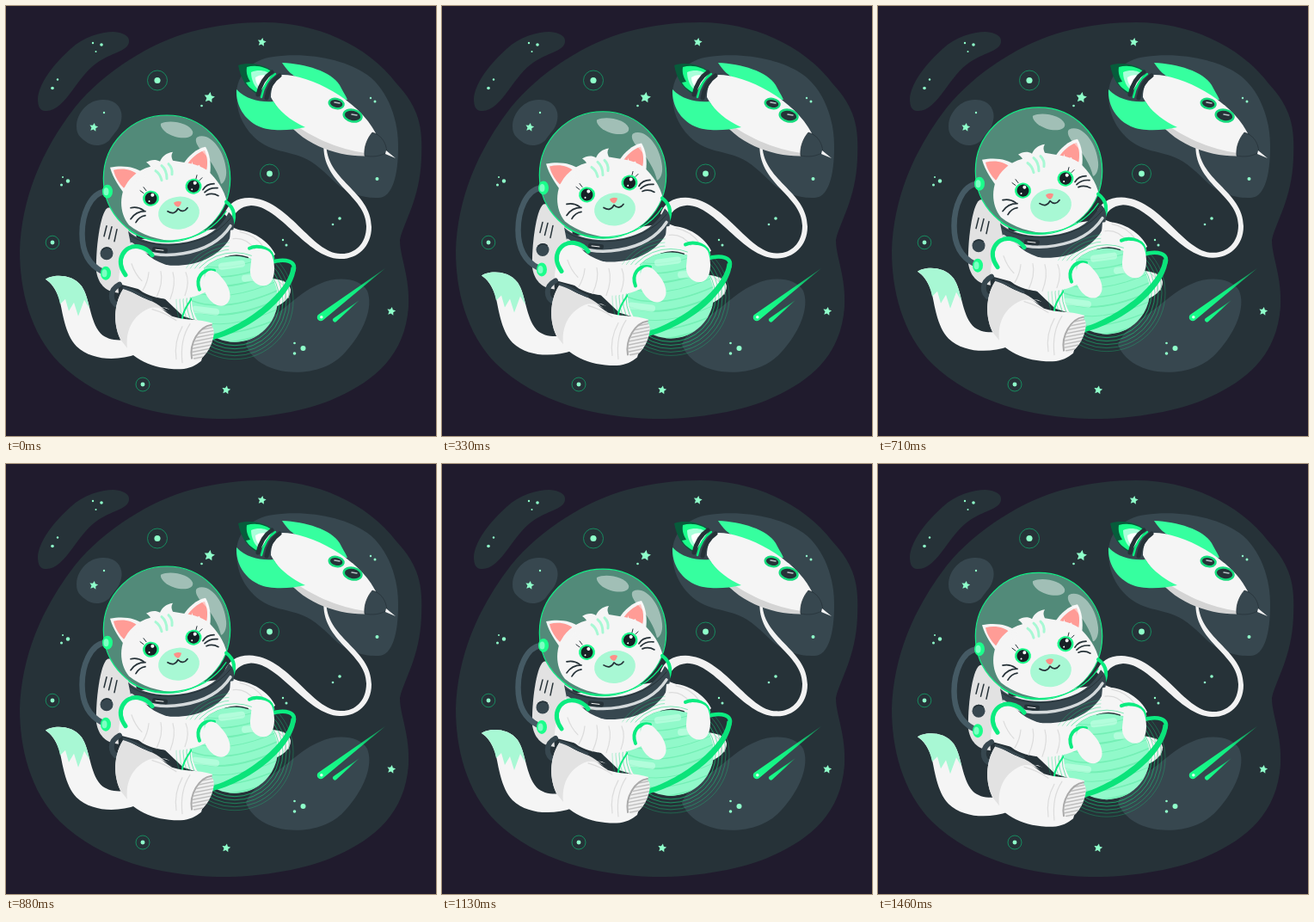
Write an HTML page that moves like this. It is 500 by 500 pixels and loops after 1.5 s.

```html
<!DOCTYPE html>
<html lang="en">
<head>
<meta charset="utf-8">
<title>Space cat</title>
<style>
html, body { margin: 0; width: 100%; height: 100%; overflow: hidden; background: #201b2d; }
svg { display: block; width: 100vw; height: 100vh; }
.line { fill: none; stroke-linecap: round; stroke-linejoin: round; }
.night { fill: #263238; }
.haze { fill: #37474f; }
.white { fill: #f5f5f5; }
.green { fill: #1bfe8b; }
.fin { fill: #36ff9f; }
.mint { fill: #a8f8d4; }
.ink { stroke: #263238; }
.slate { stroke: #37474f; }
.neon { stroke: #0bec80; }
.fold { stroke: #dcdcdc; stroke-width: 1.2; }
</style>
</head>
<body>
<svg viewBox="0 0 500 500">
  <defs>
    <linearGradient id="trail" x1="0" y1="1" x2="1" y2="0">
      <stop offset="0" stop-color="#1bfe8b"/><stop offset=".6" stop-color="#10ec80"/>
      <stop offset="1" stop-color="#0be37a" stop-opacity=".4"/>
    </linearGradient>
    <clipPath id="globe"><circle cx="266" cy="340" r="50"/></clipPath>
    <clipPath id="sole"><ellipse cx="229" cy="391" rx="9.5" ry="22" transform="rotate(25 229 391)"/></clipPath>
    <clipPath id="glass"><circle cx="187" cy="200" r="73.5"/></clipPath>
  </defs>

  <!-- sky -->
  <path class="night" d="M300 19C360 19 420 45 454 90C480 118 485 140 483 178C481 225 463 250 458 272C458 292 470 315 468 350C464 405 430 435 385 455C350 472 290 481 245 480C180 478 110 462 62 415C28 380 16 330 16 285C18 225 40 170 80 118C115 75 170 42 215 30C245 22 275 19 300 19Z"/>
  <path class="night" d="M37 108C38 90 55 68 75 50C90 36 110 30 125 30C137 31 144 35 143 42C142 51 127 54 114 61C98 69 89 82 78 97C68 111 58 122 47 122C40 123 37 117 37 108Z"/>
  <g class="haze">
    <path d="M82 140C82 124 96 109 112 109C128 108 137 120 134 133C132 144 125 148 121 155C114 164 100 164 92 157C85 152 82 148 82 140Z"/>
    <path d="M268 103C268 80 285 62 311 59C350 53 395 62 420 80C445 98 457 135 456 165C456 195 450 223 433 223C415 224 395 216 385 207C371 194 360 182 345 176C325 168 305 169 288 152C274 138 268 122 268 103Z"/>
    <path d="M365 323C385 314 411 316 420 331C428 351 415 380 395 402C378 422 350 428 325 425C298 421 284 407 279 394C285 377 305 365 325 350C337 340 350 329 365 323Z"/>
  </g>
  <g id="stars" fill="#8fffca"></g>
  <g fill="url(#trail)">
    <path d="M441 305L369 365A4 4 0 0 1 363 359Z"/>
    <path d="M411 342L384 367A2.3 2.3 0 0 1 381 363Z"/>
  </g>
  <circle cx="366.8" cy="361.8" r="1.8" fill="#d6ffec"/>

  <!-- tether -->
  <path id="rope" fill="#f2f2f2" d="M372.500 159C371 203 425 215 425 257C425 281 407 295 388 294C350 293 318 232 285 232C272 233 266 240 262 250L254 242C258 230 268 223 283 223C328 224 356 288 389 288C404 289 419 278 419 256C419 220 366 207 369.500 159Z"/>

  <!-- rocket -->
  <path fill="#075c3b" d="M270 69C282 65 300 67 311 77L293 103C279 96 273 84 270 69Z"/>
  <path class="green" d="M280 71C291 68 303 71 311 78L294 102C288 98 282 95 279 89L284 88C281 83 279 78 280 71Z"/>
  <path fill="#a9ffda" d="M285 77C295 73 304 76 309 80L296 99C289 95 285 86 285 77Z"/>
  <path fill="#fff" d="M290 83C297 79 303 80 307 83L297 96C293 93 290 89 290 83Z"/>
  <path class="fin" d="M321 66C348 67 378 76 388 92C391 98 395 104 397 109C376 108 352 94 341 85C333 81 327 75 321 66Z"/>
  <path class="white" d="M318 80C350 78 410 108 430 148L418 174C385 174 342 158 322 129C316 118 311 112 308 106C308 95 312 86 318 80Z"/>
  <path fill="#d4d4d4" d="M322 127C350 152 388 167 418 171L417 174.500C385 175 340 160 322 127Z"/>
  <path class="fin" d="M268 97C280 109 295 112 311 111C317 121 330 133 348 141C330 145 307 146 294 140C277 132 267 116 268 97Z"/>
  <g class="line">
    <path class="ink" d="M309 77Q297 85 293 103" stroke-width="5"/>
    <path class="neon" d="M313 79Q301 87 297 106" stroke-width="2.500"/>
    <path class="ink" d="M318 81Q306 89 303 107" stroke-width="5"/>
  </g>
  <path class="haze" stroke="#263238" stroke-width=".7" d="M426 147C436 150 442 158 443 170C435 175 426 176 417 174C416 164 420 154 426 147Z"/>
  <path class="white" d="M442 168L453 177L441 172Z"/>
  <g stroke="#16db7d" stroke-width="2.500" class="night">
    <ellipse cx="384" cy="113.500" rx="8.500" ry="5.500" transform="rotate(12 384 114)"/>
    <ellipse cx="403" cy="127.500" rx="10.500" ry="6.800" transform="rotate(12 403 128)"/>
  </g>
  <path class="line" stroke="#b9c3c6" stroke-width="1.500" d="M382 112L388 113M402 126L408 127"/>

  <g id="cat">
    <!-- tail -->
    <path class="white" d="M46 317C52 312 76 309 88 325C98 340 97 365 110 380C120 390 138 389 150 384L152 404C130 412 100 412 82 395C68 380 66 355 62 340C58 328 52 321 46 317Z"/>
    <path class="mint" d="M46 317C52 312 76 309 88 325C92 331 95 340 97 351L91 341L84 360L79 344L73 354L69 340L63 346C60 330 53 321 46 317Z"/>

    <!-- backpack -->
    <path fill="#e2e2e2" d="M118 234C109 240 104 285 105 308C108 325 118 332 132 333L155 300L150 252C140 240 126 232 118 234Z"/>
    <path class="line ink" stroke-width="1.500" d="M117 255L114 267M123 256L119.500 270M129 259L126 273"/>
    <circle class="haze" cx="117" cy="287" r="7.500"/>
    <path class="line ink" d="M112 283A7 7 0 0 1 122 282" stroke-width="1.500"/>
    <path class="line" stroke="#455a64" stroke-width="6.500" d="M115 215C98 217 88.500 242 88.500 264C88.500 290 100 302 112 308"/>

    <!-- torso and far leg -->
    <path class="white" d="M146 272C136 290 128 310 132 335L190 352L235 364L300 345L312 292C307 278 288 266 262 256Z"/>
    <path class="white" d="M292 320C308 312 329 318 331 329C331 341 317 349 303 353Z"/>
    <path class="line" stroke="#c9c9c9" stroke-width="1" d="M318 320Q328 327 324 342M323 319Q333 327 328 339"/>
    <path class="night" d="M130 322L132 345L186 350C196 355 207 363 219 369L228 367L205 348L160 330Z"/>
    <path class="white" d="M185 340L222 338L228 367L206 360Z"/>

    <!-- helmet -->
    <circle cx="187" cy="200" r="73.700" fill="#528a79" stroke="#13ed86" stroke-width="1.200"/>
    <g id="valves"></g>

    <!-- head -->
    <g clip-path="url(#glass)">
      <path class="white" d="M121 187C138 184 151 187 159 193L137 217C132 209 125 201 121 187Z"/>
      <path fill="#ff9c96" d="M125 190C137 187 147 190 153 195L137 211C132 206 127 199 125 190Z"/>
      <path class="white" d="M232 163C221 165 212 174 206 183L237 196C239 184 237 171 232 163Z"/>
      <path fill="#ff9c96" d="M231 167C222 170 215 177 210 184L233 191C235 182 234 174 231 167Z"/>
      <path class="white" d="M137 212C132 225 133 242 143 254C160 268 190 276 215 271C240 266 258 250 257 228C254 212 244 200 236 192C228 185 215 182 206 181L194 179C192 175 192 172 194 169C186 170 181 175 179 180C174 177 168 178 163 181C165 182 167 184 168 186C152 190 142 201 137 212Z"/>
      <path class="white" d="M145 203L149 207L155 198L157 207L163 194L148 198ZM216 180L219 187L225 184L227 191L234 190L236 197L216 190Z"/>
    </g>
    <path class="line" stroke="#a8f8d4" stroke-width="3" d="M174 191Q179 194 181 202M181 185Q187 190 187 200M189 183Q194 188 193 195"/>
    <ellipse class="mint" cx="201" cy="240" rx="24" ry="19" transform="rotate(-8 201 240)"/>
    <g id="eyes"></g>
    <path fill="#ff8f88" d="M195 228Q199 225 204 227Q203 232 200 233Q196 232 195 228Z"/>
    <g class="line ink" stroke-width="1.700">
      <path d="M188 238Q196 243 200 235Q206 241 211 234"/>
      <path d="M145 234Q153 232 160 237M145 247Q151 238 162 238M151 251Q155 244 162 243"/>
      <path d="M229 213Q233 206 242 206M231 216Q237 210 246 211M233 219Q240 216 247 220"/>
      <path stroke-width="1" d="M160 217L156 214M163 214L160 210M221 200L222 196M225 202L228 199"/>
    </g>
    <g fill="#fff" opacity=".46">
      <path d="M180 136C190 131 213 135 217 145C219 153 206 154 196 151C186 148 179 141 180 136Z"/>
      <path d="M222 152C236 145 254 166 256 190C257 199 253 206 250 206C247 193 239 180 228 168C222 162 219 155 222 152Z"/>
    </g>

    <!-- collar -->
    <path class="line neon" stroke-width="4" d="M256 227Q272 239 260 260"/>
    <path class="haze" d="M142 261C153 272 178 278 201 275C229 272 249 260 259 239C268 246 267 260 258 273C245 291 223 301 196 301C172 301 153 292 146 281Z"/>
    <path class="line" stroke="#d5dadc" stroke-width="3.500" d="M146 276C160 288 183 291 206 287C230 283 250 272 261 255"/>
    <path class="line ink" stroke-width="1" d="M144 266C170 284 232 283 261 246"/>
    <path class="line neon" stroke-width="1.300" d="M143 260C171 280 230 278 256 238"/>
    <rect class="night" x="170" y="280" width="18" height="6" rx="2.500" transform="rotate(6 179 283)"/>
    <path class="line" stroke="#f5f5f5" stroke-width="1" d="M174 282.500L183 283.500"/>

    <!-- planet -->
    <g id="halo" fill="none" stroke="#18dc82" stroke-width=".8"></g>
    <path class="line neon" stroke-width="4.500" d="M306 298C325 292 339 296 334 308"/>
    <path class="line neon" stroke-width="2" d="M218 337Q204 355 205 366"/>
    <path class="line ink" stroke-width="2" d="M255 292Q268 287 281 292"/>
    <circle cx="266" cy="340" r="50" fill="#91f9ca"/>
    <g clip-path="url(#globe)">
      <g id="bands" class="line" stroke="#74efb5"></g>
      <path class="line" stroke="#c5ffe5" opacity=".65" stroke-width="8" d="M251 302L274 299M222 322L231 324M220 352L244 355M278 316L291 315"/>
    </g>
    <path fill="#0be37a" d="M337 301C338 332 290 376 236 388.500L236 383C283 369 329 330 331.500 303Z"/>

    <!-- arms -->
    <path class="white" d="M261 260C282 257 305 271 313 288L304 297L286 288L259 283Z"/>
    <path class="white" d="M134 301C128 285 148 274 162 286C176 300 200 307 230 304L232 332C212 342 181 344 159 332C147 324 137 313 134 301Z"/>
    <path class="line fold" d="M166 309Q165 320 159 330M180 308Q183 321 175 338M194 309Q198 322 191 340M209 309Q214 320 208 336M264 270Q279 268 289 282M272 262Q289 265 299 279M146 299Q150 311 158 319"/>
    <path class="line neon" stroke-width="5" d="M139 312C126 294 138 277 154 279Q165 281 170 289"/>
    <path class="line neon" stroke-width="4" d="M225 329C220 316 228 304 242 307M283 281C294 276 311 282 310 294"/>
    <path class="white" d="M231 315C232 305 242 304 249 313C259 323 264 337 258 344C252 352 240 347 234 337C229 329 228 321 231 315Z"/>
    <path class="white" d="M286 287C292 278 307 281 310 291C314 305 312 321 303 324C292 327 283 317 284 306Z"/>

    <!-- near leg -->
    <path class="line slate" stroke-width="6" d="M132 323C119 330 121 343 130 348"/>
    <path class="white" d="M137 327C127 342 123 365 133 387C146 411 172 422 203 421.500C214 421 221 417 227 412L240 368C225 363 207 365 193 360C183 354 175 345 163 340C152 336 145 330 137 327Z"/>
    <path fill="#e2e2e2" d="M137 327C127 342 123 365 133 387L141 397C139 378 146 360 166 351C178 347 186 354 194 360C181 350 176 344 163 340C152 336 145 330 137 327Z"/>
    <path class="line slate" stroke-width="3" d="M137 327C147 329 158 337 169 341"/>
    <path class="line fold" d="M205 372Q195 390 198 410M214 369Q202 387 205 414M170 352Q187 357 198 365"/>
    <g clip-path="url(#sole)">
      <path fill="#eee" d="M210 360H250V420H210Z"/>
      <path id="tread" stroke="#bdbdbd" stroke-width="1.300"/>
    </g>
    <path class="line" stroke="#aaa" stroke-width="2" d="M239 370C224 372 213 392 216 409"/>
  </g>
</svg>
<script>
const $ = id => document.getElementById(id);
const dot = (x, y, r, attrs = "") => `<circle cx="${x}" cy="${y}" r="${r}" ${attrs}/>`;
const range = (n, f) => Array.from({ length: n }, (_, i) => f(i)).join("");

function star([x, y, r]) {
  const pts = range(10, i => {
    const a = i * Math.PI / 5 - 1.4, d = i % 2 ? r * .5 : r;
    return `${x + d * Math.cos(a)},${y + d * Math.sin(a)} `;
  });
  return `<polygon points="${pts}"/>`;
}

const beacon = ([x, y, r]) =>
  dot(x, y, r, 'fill="none" stroke="#169462" stroke-width=".9"') + dot(x, y, r * .31);

const eye = (x, y, tilt) => `<g transform="translate(${x} ${y}) rotate(${tilt})">
  <ellipse rx="9.500" ry="9" class="green"/><circle r="7" fill="#172126"/>
  ${dot(2.5, -3.5, 2, 'fill="#fff"')}${dot(-2.5, 3, 1, 'fill="#fff"')}</g>`;

const valve = (x, y) => `<g transform="translate(${x} ${y})">
  <ellipse rx="6" ry="8" class="green"/><ellipse cx="-1.500" rx="3" ry="4.500" fill="#7dffc3"/></g>`;

const specks = [
  [101, 43, 1.2], [111, 45, 1.8], [104.5, 53, 1], [60, 85.5, 1.2], [54, 95.5, 1.8],
  [114, 124, 1.2], [227.5, 116, 1.3], [64.5, 208, 1.5], [72, 203.5, 2.2], [66, 199, 1],
  [424, 107, 1.2], [429, 111, 1.5], [431.5, 201, 2], [388, 247, 1.8], [380, 254, 1.3],
  [322, 272, 1.2], [326, 278, 1.5], [335.5, 392, 1.3], [345.5, 398, 3], [335.5, 404, 1.8]
];
$("stars").innerHTML =
  [[297.5, 42, 5.2], [236.5, 106.5, 6.5], [102, 141, 5.2], [448, 355, 5.2], [256, 446.5, 5.2]].map(star).join("") +
  [[176, 86.5, 11.5], [306.5, 195, 11], [54, 275, 7.8], [159, 440, 8]].map(beacon).join("") +
  specks.map(s => dot(...s)).join("");
$("eyes").innerHTML = eye(168.5, 223, -10) + eye(218, 209, -12);
$("valves").innerHTML = valve(118, 215) + valve(116, 310);
$("halo").innerHTML = range(5, i => dot(266, 342, 52 + i * 4, `opacity="${.8 - i * .11}"`));
$("bands").innerHTML = range(9, i => {
  const y = 298 + i * 11;
  return `<path stroke-width="${1 + i % 3 * .5}" d="M216 ${y}Q256 ${y + 15} 318 ${y - 13}"/>`;
});
$("tread").setAttribute("d", range(15, i => `M210 ${367 + i * 4}l40 -8`));

const LOOP = 1500, FPS = 24, HALF = 18, LIFT = 9.6, REST = .7;

function draw(now) {
  const step = Math.floor((now % LOOP + 5) * FPS / 1000) % (HALF * 2);
  const rise = 1 - Math.abs(1 - step / HALF);
  $("cat").setAttribute("transform", `translate(0 ${REST - LIFT * rise})`);
  // the tether tightens slightly below its fixing on the rocket
  $("rope").setAttribute("transform", `translate(0 159) scale(1 ${1 - .01 * rise}) translate(0 -159)`);
  requestAnimationFrame(draw);
}
draw(performance.now());
</script>
</body>
</html>
```
